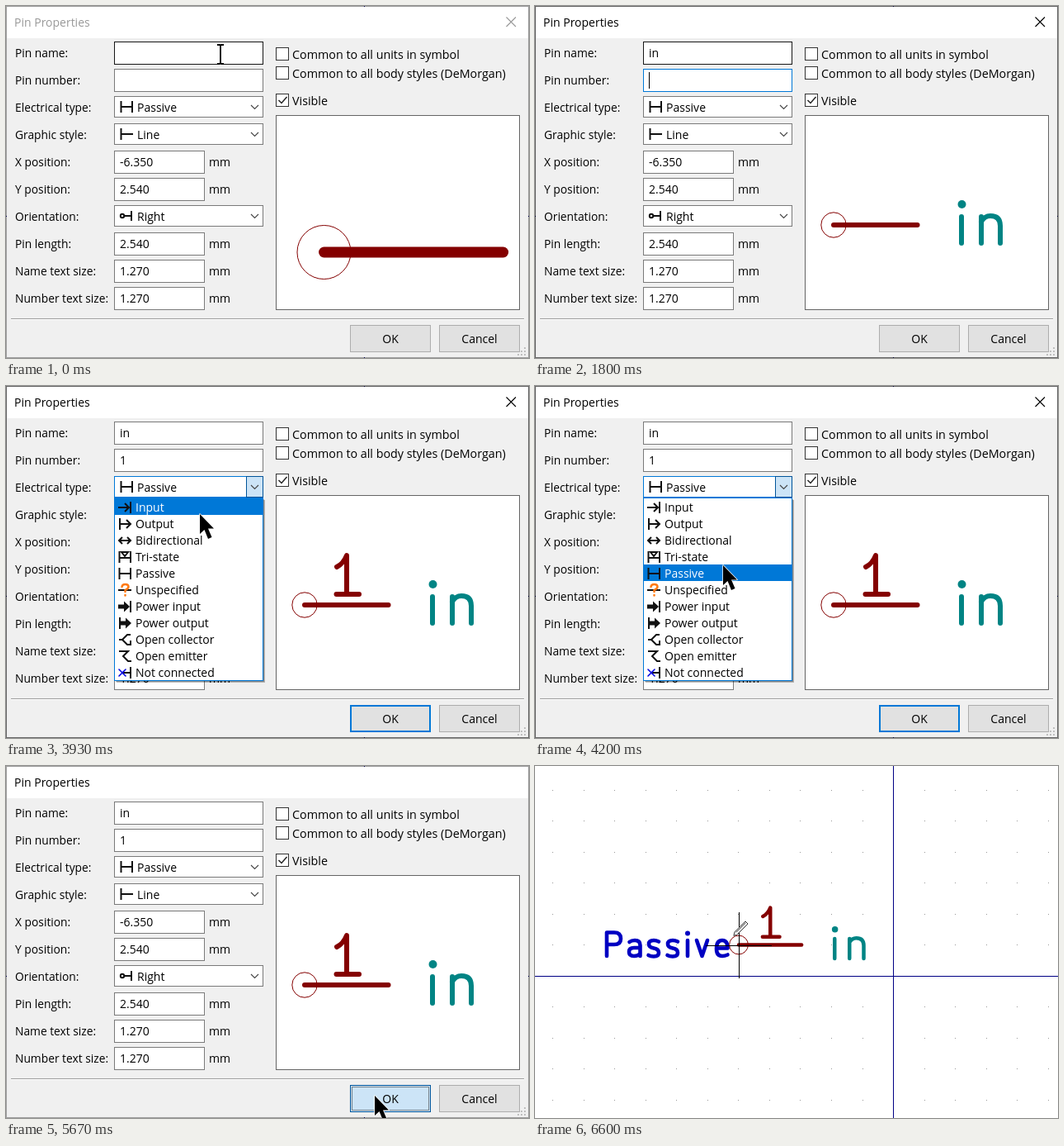
Write an HTML page with a canvas that moves like this. It is 634 by 426 pixels and loops after 7.54 s.

```html
<!DOCTYPE html>
<html lang="en">
<head>
<meta charset="utf-8">
<title>Pin Properties</title>
<style>
  html, body { margin: 0; width: 100%; height: 100%; overflow: hidden; background: #fff; }
  canvas { position: absolute; left: 0; top: 0; }
</style>
</head>
<body>
<canvas id="editor" width="634" height="426"></canvas>
<canvas id="dialog" width="634" height="426"></canvas>
<script>
const W = 634, H = 426, LOOP = 7540, TICK = 1000 / 15;
const dialog = document.getElementById('dialog');
const ed = document.getElementById('editor').getContext('2d');
const g = dialog.getContext('2d');

const FAMILY = '"Open Sans", "Noto Sans", sans-serif';
const GRAY = [122, 122, 122], DARK = [23, 23, 23], BLUE = [0, 120, 215];
const PIN_RED = '#840000', TEAL = '#008484', ACCENT = '#0078d7';

const clamp = v => Math.max(0, Math.min(1, v));
const smooth = v => v * v * (3 - 2 * v);
const mix = (a, b, v) => a.map((c, i) => c + (b[i] - c) * clamp(v));
const css = c => `rgb(${c.map(Math.round)})`;

// Keys are [tick, x, y]; each leg is eased.
function along(keys, k) {
  const n = keys.findIndex(p => p[0] > k);
  if (n < 0) return keys[keys.length - 1].slice(1);
  if (n === 0) return keys[0].slice(1);
  const a = keys[n - 1], b = keys[n];
  const v = smooth((k - a[0]) / (b[0] - a[0]));
  return [a[1] + (b[1] - a[1]) * v, a[2] + (b[2] - a[2]) * v];
}

// Basic drawing
function box(x, y, w, h, border, fill) {
  g.fillStyle = border;
  g.fillRect(x, y, w, h);
  g.fillStyle = fill;
  g.fillRect(x + 1, y + 1, w - 2, h - 2);
}
function text(s, x, y, color = '#000', align = 'left', size = 14) {
  g.font = `${size}px ${FAMILY}`;
  g.textAlign = align;
  g.fillStyle = color;
  g.fillText(s, x, y);
}
function stroke(c, d, color, width, cap = 'round') {
  c.strokeStyle = color;
  c.lineWidth = width;
  c.lineCap = cap;
  c.lineJoin = cap === 'round' ? 'round' : 'miter';
  c.stroke(new Path2D(d));
}
function disc(c, x, y, r, color) {
  c.fillStyle = color;
  c.beginPath();
  c.arc(x, y, r, 0, 7);
  c.fill();
}

// Pin symbol; at scale 1 the pin is 101 long
function drawPin(c, x, y, s, name, number) {
  c.save();
  c.translate(x, y);
  c.scale(s, s);
  stroke(c, 'M0 0H101.5', PIN_RED, 6);
  c.strokeStyle = PIN_RED;
  c.lineWidth = 1 / s;
  c.beginPath();
  c.arc(0, 0, 15.2, 0, 7);
  c.stroke();
  if (number) stroke(c, 'M39 -46Q47 -50 51 -60V-13M38.5 -13H66', PIN_RED, 6);
  if (name) {
    disc(c, 155.5, -25, 5, TEAL);
    stroke(c, 'M155 -10V22', TEAL, 6);
  }
  if (name === 'in') stroke(c, 'M179 -10V22M179 -4Q183 -11 190 -11Q202 -11 202 1V22', TEAL, 6);
  c.restore();
}

const letterS = x => `M${x + 12} -4.5q-3 -1.5 -6 -1.5q-6 0 -6 4.5q0 4 6 5q6 1 6 5.5q0 4.5 -6 4.5q-4 0 -6.5 -1.5`;
const PASSIVE = 'M-160 13V-15.5H-151Q-143 -15.5 -143 -8Q-143 -1 -151 -1H-160'
  + 'M-119.5 13V0Q-119.5 -6 -126 -6Q-130 -6 -132.5 -4M-119.5 3H-127Q-133 3 -133 8Q-133 13 -127 13Q-122 13 -119.5 10'
  + letterS(-109) + letterS(-86) + 'M-62 -6V13M-51 -6L-44.5 13L-38 -6'
  + 'M-13.5 11.5Q-17 13 -20 13Q-27 13 -27 4Q-27 -6 -20 -6Q-13.5 -6 -13.5 3.5H-27';

// Editor
const PENCIL_PATH = [[86, 247, 178], [91, 222, 180], [94, 206, 206], [99, 241, 205]];

function drawEditor(k) {
  ed.fillStyle = '#fff';
  ed.fillRect(0, 0, W, H);
  ed.fillStyle = '#999';
  for (let x = 21.5; x < W; x += 37.55)
    for (let y = 29; y < H; y += 37.55) ed.fillRect(Math.floor(x), Math.floor(y), 1, 1);
  ed.fillStyle = '#000084';
  ed.fillRect(434, 0, 1, H);
  ed.fillRect(0, 254, W, 1);

  const x = k >= 90 && k < 97 ? 210 : 247;
  const y = k < 92 ? 179 : 217;
  ed.save();
  ed.translate(x, y);
  stroke(ed, PASSIVE, '#0000c2', 4.6);
  disc(ed, -62, -14.5, 3, '#0000c2');
  ed.restore();
  drawPin(ed, x, y - .5, .75, 'in', true);
  ed.fillStyle = '#000';
  ed.fillRect(x, y - 40, 1, 80);
  ed.fillRect(x - 40, y, 80, 1);

  const [px, py] = along(PENCIL_PATH, k);
  ed.save();
  ed.translate(px, py);
  ed.fillStyle = '#fff';
  ed.fill(new Path2D('M0 0L1 -4L14 -17L17 -14L4 -1Z'));
  stroke(ed, 'M0 0L1 -4L14 -17L17 -14L4 -1ZM3 -4L14 -15', '#333', 1);
  ed.restore();
}

// Icons sit in a 16 wide cell, centred on y = 0
const TYPES = [
  ['Input', 'M0 0H13M8 -5L13 0L8 5M15 -7V7'],
  ['Output', 'M2 -7V7M2 0H15M10 -5L15 0L10 5'],
  ['Bidirectional', 'M1 0H15M5 -4L1 0L5 4M11 -4L15 0L11 4'],
  ['Tri-state', 'M1.5 -7V7M15 -7V7M1.5 1H15M4 -6H12L8 -1Z'],
  ['Passive', 'M1.5 -7V7M1.5 0H15M15 -7V7'],
  ['Unspecified', 'M0 0H16'],
  ['Power input', 'M15 -7V7'],
  ['Power output', 'M2 -7V7'],
  ['Open collector', 'M1 0H5L11 -6H15M5 0L11 6H15V1'],
  ['Open emitter', 'M1 -6H12L6 0L12 6H16'],
  ['Not connected', 'M5 0H15M15 -7V7']
];
const ICONS = Object.fromEntries(TYPES);
ICONS.Line = 'M1.5 -7V7M1.5 0H16';
ICONS.Right = 'M5 0H14M14 -6V6';

function icon(name, x, y) {
  g.save();
  g.translate(x, y);
  stroke(g, ICONS[name], '#111', 2, 'butt');
  if (name === 'Right') {
    g.beginPath();
    g.arc(3, 0, 2.2, 0, 7);
    g.stroke();
  }
  if (name === 'Unspecified') stroke(g, 'M4.5 -4Q5 -7 8.5 -7Q12.5 -7 12.5 -4Q12.5 -2 8.5 0V2M8.5 6V6.5', '#ff7a14', 2.5);
  if (name === 'Not connected') stroke(g, 'M1 -4L9 4M9 -4L1 4', '#0000e0', 1.6);
  if (name.startsWith('Power')) {
    const x0 = name === 'Power input' ? 7 : 9;
    g.fillStyle = '#111';
    g.fillRect(x0 - 7, -2.5, 8, 5);
    g.fill(new Path2D(`M${x0} -6.5L${x0 + 7} 0L${x0} 6.5Z`));
  }
  g.restore();
}

// Dialog parts
const rowTop = i => 43 + 33 * i;

function field(i, w, value, border = GRAY) {
  box(131, rowTop(i), w, 28, css(border), '#fff');
  text(value, 138, rowTop(i) + 19);
}
function combo(i, value, border = GRAY, mode = '') {
  const top = rowTop(i);
  box(131, top, 181, 26, css(border), '#fff');
  if (mode) box(291, top, 21, 26, mode === 'open' ? '#005499' : ACCENT, mode === 'open' ? '#cce4f7' : '#e5f1fb');
  if (mode === 'chosen') {
    g.fillStyle = ACCENT;
    g.fillRect(134, top + 3, 156, 21);
  }
  icon(value, 138, top + 13);
  text(value, 159, top + 19, mode === 'chosen' ? '#fff' : '#000');
  stroke(g, `M297 ${top + 11}l4.5 4.5l4.5 -4.5`, '#444', 1.1, 'butt');
}
function check(y, label, on) {
  box(327, y, 16, 16, '#333', '#fff');
  if (on) stroke(g, `M330.5 ${y + 8}l3.5 3.5l6.5 -7.5`, '#222', 1.5, 'butt');
  text(label, 347, y + 14, '#000', 'left', 14.3);
}
function button(x, label, border, fill, thick) {
  box(x, 386, 98, 33, border, fill);
  if (thick) box(x + 1, 387, 96, 31, border, fill);
  text(label, x + 49, 408, '#000', 'center');
}
function caret(x, i) {
  g.fillStyle = '#000';
  g.fillRect(x, rowTop(i) + 4, 1, 20);
}

// The list slides out from under the combo, bottom edge first.
function dropList(k, mouseY) {
  const top = 135, height = 222;
  const full = k >= 50;
  const shown = full ? height : (k - 46) * 41 + 1;
  g.fillStyle = 'rgba(0,0,0,.25)';
  g.fillRect(134, top + 3, 180, shown - 1);
  g.fillRect(133, top + 2, 180, shown - 1);
  g.save();
  g.beginPath();
  g.rect(131, top, 181, shown);
  g.clip();
  g.translate(0, shown - height);
  box(131, top, 181, height, full ? ACCENT : '#646464', '#fff');
  const sel = mouseY < 137 ? 4 : Math.min(10, Math.floor((mouseY - 137) / 20));
  TYPES.forEach(([name], i) => {
    const y = 136 + 20 * i;
    const on = full && i === sel;
    if (on) {
      g.fillStyle = ACCENT;
      g.fillRect(132, y, 179, 20);
    }
    icon(name, 136, y + 11);
    text(name, 157, y + 16, on ? '#fff' : '#000');
  });
  g.restore();
}

function pointer(x, y, beam) {
  g.save();
  g.translate(Math.round(x), Math.round(y));
  if (beam) {
    const shape = 'M-4 -11H-1L0 -10L1 -11H4M0 -10V11M-4 12H-1L0 11L1 12H4';
    stroke(g, shape, '#fff', 3.5, 'butt');
    stroke(g, shape, '#000', 1.8, 'butt');
  } else {
    const shape = 'M0 0V24L5.5 19L10 30L14.5 28L10 17.5H17Z';
    stroke(g, shape, '#fff', 1.5);
    g.fillStyle = '#000';
    g.fill(new Path2D(shape));
  }
  g.restore();
}

const MOUSE_PATH = [
  [0, 260, 58], [38, 260, 60], [44, 242, 123], [50, 242, 123], [54, 241, 126],
  [59, 235, 155], [63, 228, 217], [71, 228, 218], [74, 224, 221], [82, 447, 399]
];
const LABELS = ['Pin name', 'Pin number', 'Electrical type', 'Graphic style', 'X position',
  'Y position', 'Orientation', 'Pin length', 'Name text size', 'Number text size'];

function drawDialog(k) {
  const [mx, my] = along(MOUSE_PATH, k);
  const active = k >= 1, open = k >= 47 && k < 71;
  const name = k < 14 ? '' : k < 17 ? 'i' : 'in';
  const number = k < 32 ? '' : '1';
  const ink = active ? '#000' : '#999';

  g.clearRect(0, 0, W, H);
  g.fillStyle = active && k < 84 ? 'rgba(0,0,0,.6)' : 'rgba(0,0,0,.38)';
  g.fillRect(0, 0, W, H);
  g.fillStyle = '#f0f0f0';
  g.fillRect(1, 1, W - 2, H - 2);
  g.fillStyle = '#fff';
  g.fillRect(1, 1, W - 2, 38);
  text('Pin Properties', 10, 25, ink);
  if (k < 84) stroke(g, 'M606.5 13.5L618 25M618 13.5L606.5 25', ink, 1.1, 'butt');

  LABELS.forEach((s, i) => text(s + ':', 11, rowTop(i) + 19, '#000', 'left', 13.8));
  [4, 5, 7, 8, 9].forEach(i => text('mm', 246, rowTop(i) + 19));

  let nameEdge = mix(DARK, BLUE, k / 5);
  if (k >= 23) nameEdge = mix(BLUE, DARK, (k - 22) / 5);
  if (k >= 40) nameEdge = mix(DARK, GRAY, (k - 40) / 5);
  let numEdge = mix(GRAY, BLUE, (k - 22) / 4);
  if (k >= 49) numEdge = mix(BLUE, GRAY, (k - 48) / 3);
  field(0, 181, name, nameEdge);
  field(1, 181, number, numEdge);
  if (active && k < 23) caret(138 + [0, 4, 13][name.length], 0);
  else if (k >= 23 && k < 39) caret(number ? 147 : 138, 1);

  let typeEdge = mix(GRAY, DARK, (k - 42) / 4), mode = '';
  if (k >= 50) { typeEdge = BLUE; mode = 'open'; }
  if (k >= 71) mode = 'chosen';
  if (k >= 83) { typeEdge = GRAY; mode = ''; }
  combo(2, 'Passive', typeEdge, mode);
  combo(3, 'Line');
  field(4, 110, '-6.350');
  field(5, 110, '2.540', k < 76 ? mix(GRAY, DARK, (k - 71) / 3) : mix(DARK, GRAY, (k - 76) / 4));
  combo(6, 'Right');
  field(7, 110, '2.540');
  field(8, 110, '1.270');
  field(9, 110, '1.270');

  check(50, 'Common to all units in symbol', false);
  check(73, 'Common to all body styles (DeMorgan)', false);
  check(106, 'Visible', true);

  box(327, 132, 296, 236, '#646464', '#fff');
  if (!name) drawPin(g, 385.5, 298, 2.14, '', false);
  else if (name === 'i') drawPin(g, 366, 269.5, 1.2, name, false);
  else drawPin(g, 362, 265, 1, name, !!number);

  g.fillStyle = '#a0a0a0';
  g.fillRect(6, 378, 622, 1);
  g.fillStyle = '#fff';
  g.fillRect(6, 379, 622, 1);

  if (k >= 83) {
    button(417, 'OK', '#005499', '#cce4f7');
    g.setLineDash([1, 1]);
    stroke(g, 'M419.5 388.5H512.5V416.5H419.5Z', '#222', 1, 'butt');
    g.setLineDash([]);
  } else if (k >= 50) {
    button(417, 'OK', ACCENT, css(mix([225, 225, 225], [229, 241, 251], (k - 79) / 3)), true);
  } else button(417, 'OK', '#adadad', '#e1e1e1');
  button(525, 'Cancel', '#adadad', '#e1e1e1');

  g.fillStyle = '#bfbfbf';
  for (let i = 0; i < 3; i++)
    for (let j = 0; j <= i; j++) g.fillRect(628 - 4 * j, 413 + 4 * i, 2, 2);

  if (open) dropList(k, my);
  if (k >= 14 && k < 36) return;
  const overText = my < 104 || (k >= 71 && mx < 241 && my > 208 && my < 236);
  pointer(mx, my, overText && !open);
}

function draw(now) {
  const k = Math.floor((now % LOOP + 3.4) / TICK);
  const alpha = clamp((89 - k) / 4);
  drawEditor(k);
  dialog.style.opacity = alpha;
  if (alpha > 0) drawDialog(k);
}

const start = performance.now();
function frame() {
  draw(performance.now() - start);
  requestAnimationFrame(frame);
}
frame();
</script>
</body>
</html>
```
